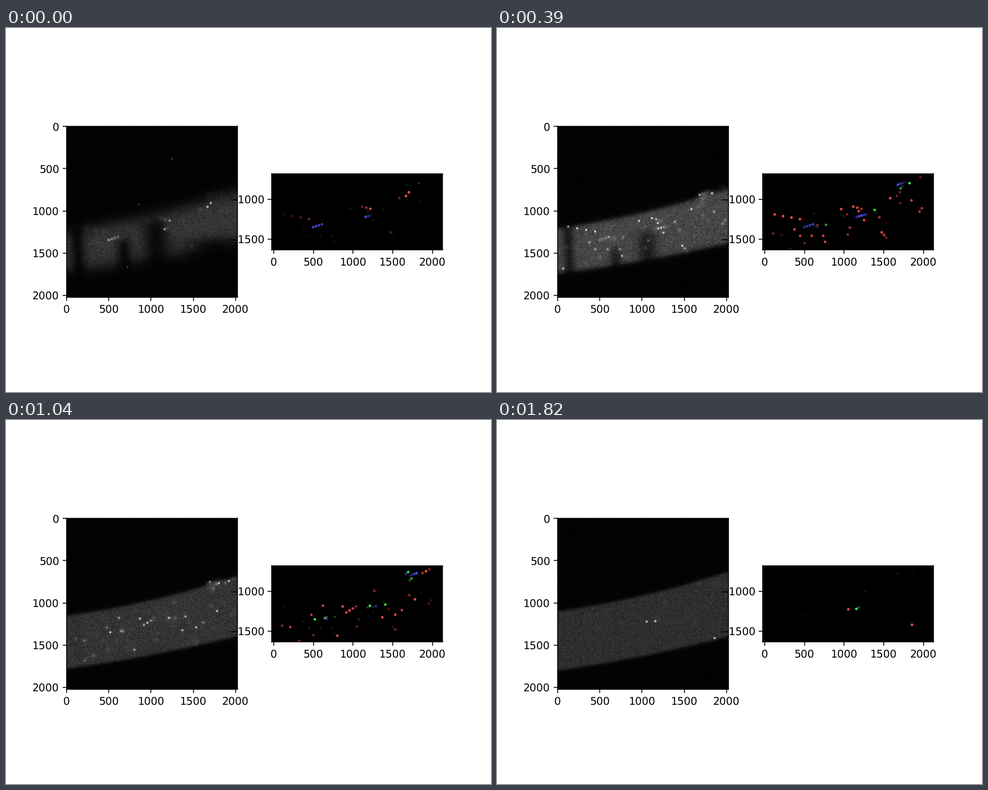
Animation of 864x648 px, one loop 1950 ms. Source, as a matplotlib script:

```python
import numpy as np
import matplotlib.pyplot as plt
from matplotlib.animation import FuncAnimation

FRAMES, INTERVAL = 15, 130
LAST = FRAMES - 1
SIZE, CELL = 2024, 4

plt.rcParams["path.snap"] = False
plt.rcParams["text.hinting"] = "none"

axis = np.arange(0, SIZE, CELL) + CELL / 2
X, Y = np.meshgrid(axis, axis)


def sigmoid(t):
    return 1 / (1 + np.exp(-np.clip(t, -40, 40)))


def bell(t):
    return np.exp(-t ** 2 / 2)


def top_edge(x, n):
    d = LAST - n
    bump = 58 * np.exp(-((n - 5) / 4) ** 2) * bell((x - 1755) / 65)
    return 1105 - 0.139 * x - 4.61e-5 * x ** 2 + 7.5 * d + 0.22 * d ** 2 - bump


def low_edge(x, n):
    d = LAST - n
    rise = (1.5 * d + 0.42 * d ** 2) * (1 - 0.75 * x / SIZE)
    return 1808 - 0.146 * x - 2.69e-5 * x ** 2 - rise


# Spots are rows of (x, y, frame of best focus)
def chain(count, start, end):
    return np.linspace(start, end, count)


def scatter_in_band(count, seed):
    rng = np.random.default_rng(seed)
    x = (np.arange(count) + rng.random(count)) * SIZE / count
    focus = rng.triangular(1.5, 4, 12, count)
    top, low = top_edge(x, focus), low_edge(x, focus)
    y = top + (low - top) * rng.uniform(0.1, 0.92, count)
    return np.column_stack([x, y, focus])


red = np.vstack([
    chain(4, (125, 1192, 3.6), (443, 1250, 2.6)),
    chain(3, (446, 1460, 4.2), (737, 1460, 4.2)),
    chain(4, (914, 1267, 9), (1036, 1190, 5.6)),
    chain(3, (1115, 1092, 2.7), (1218, 1120, 1)),
    chain(3, (1474, 1417, 2.9), (1530, 1482, 5.6)),
    chain(2, (1666, 958, 0.5), (1704, 912, 0.5)),
    chain(3, (1960, 725, 5.7), (1876, 770, 9.7)),
    chain(2, (1053, 1228, 13.7), (1856, 1422, 13.7)),
    scatter_in_band(29, 4),
])
green = np.vstack([
    chain(3, (772, 1322, 4.8), (517, 1353, 8.4)),
    chain(3, (1212, 1183, 8.5), (1155, 1222, 13.8)),
    chain(2, (1385, 1134, 4), (1405, 1168, 7)),
    chain(2, (1825, 797, 3.4), (1713, 863, 5)),
    chain(2, (1735, 838, 6.3), (1694, 758, 9)),
])
blue = np.vstack([
    chain(4, (498, 1350, 1), (607, 1315, 1.6)),
    chain(5, (1158, 1222, 0.8), (1287, 1187, 6)),
    chain(5, (1678, 816, 3.7), (1800, 772, 7.4)),
    chain(2, (667, 1348, 6), (1668, 778, 10.2)),
])
spots = np.vstack([red, green, blue])
colors = np.repeat([(1, 0.31, 0.30), (0.25, 0.96, 0.33), (0.31, 0.31, 1)],
                   [len(red), len(green), len(blue)], axis=0)

# Grooves as (center, width, start depth, depth change per frame)
GROOVES = [(128, 65, 1050, 0), (680, 65, 1340, 40),
           (1060, 110, 1110, 50), (1750, 230, 1340, 50)]
DUST = np.array([(1250, 390), (850, 930), (720, 1670)])


def soft_band(n, margin, edge):
    top = top_edge(axis, n) - margin
    low = low_edge(axis, n) + margin
    return sigmoid((Y - top) / edge) * sigmoid((low - Y) / edge)


def tissue(n):
    edge = 9 + 38 * np.exp(-n / 1.4)
    level = 0.172 + 0.125 * np.exp(-(n / 6) ** 2)
    level *= 1 - 0.32 * np.exp(-n / 0.9)
    body = level * (0.92 * soft_band(n, 0, edge) + 0.08 * soft_band(n, 20, 45))
    depth = 0.85 * np.exp(-(n / 5.5) ** 2)
    for center, width, start, sink in GROOVES:
        width *= 0.5 + 0.5 * np.exp(-n / 4)
        shade = bell((X - center - 0.05 * (Y - 1400)) / width)
        body *= 1 - depth * shade * sigmoid((Y - start - sink * n) / 35)
    return body


def add_spots(img, x, y, sigma, amp):
    gx = bell((axis - x[:, None]) / sigma[:, None])
    gy = bell((axis - y[:, None]) / sigma[:, None])
    img += (gy * amp[:, None]).T @ gx


def micrograph(n):
    rng = np.random.default_rng(n + 1)
    grain = rng.normal(size=X.shape)
    for ax in (0, 1):
        grain = (grain + np.roll(grain, 1, ax)) / 2
    img = tissue(n) * (1 + 0.38 * grain) + 0.01 + 0.006 * grain
    x, y, focus = spots.T
    dt = np.abs(n - focus)
    add_spots(img, x, y, 5.5 + 0.6 * dt, 1.25 * np.exp(-dt ** 2 / 1.6))
    add_spots(img, x, y, 10 + 3.5 * dt, 0.14 * np.exp(-dt ** 2 / 9))
    add_spots(img, *DUST.T, np.full(3, 5.0), np.full(3, 0.5 * np.exp(-n / 2)))
    return np.clip(img, 0, 1)


def mark_colors(n):
    alpha = np.exp(-(n - spots[:, 2]) ** 2 / 7.8)
    return np.column_stack([colors, alpha])


fig, (left, right) = plt.subplots(1, 2, figsize=(6.4, 4.8), dpi=135)
image = left.imshow(micrograph(0), cmap="gray", vmin=0, vmax=1,
                    extent=(-0.5, SIZE - 0.5, SIZE - 0.5, -0.5))
left.set_xticks(range(0, 2001, 500))
left.set_yticks(range(0, 2001, 500))

dots = right.scatter(spots[:, 0], -spots[:, 1], s=6, linewidths=0,
                     c=mark_colors(0))
right.set_facecolor("black")
right.set_aspect("equal")
right.set_xlim(-27, 2127)
right.set_ylim(-1637, -679)
right.set_xticks(range(0, 2001, 500))
right.set_yticks([-1500, -1000])


def draw(n):
    image.set_data(micrograph(n))
    dots.set_facecolors(mark_colors(n))
    return image, dots


anim = FuncAnimation(fig, draw, frames=FRAMES, interval=INTERVAL,
                     repeat=True, repeat_delay=0)
plt.show()
```
